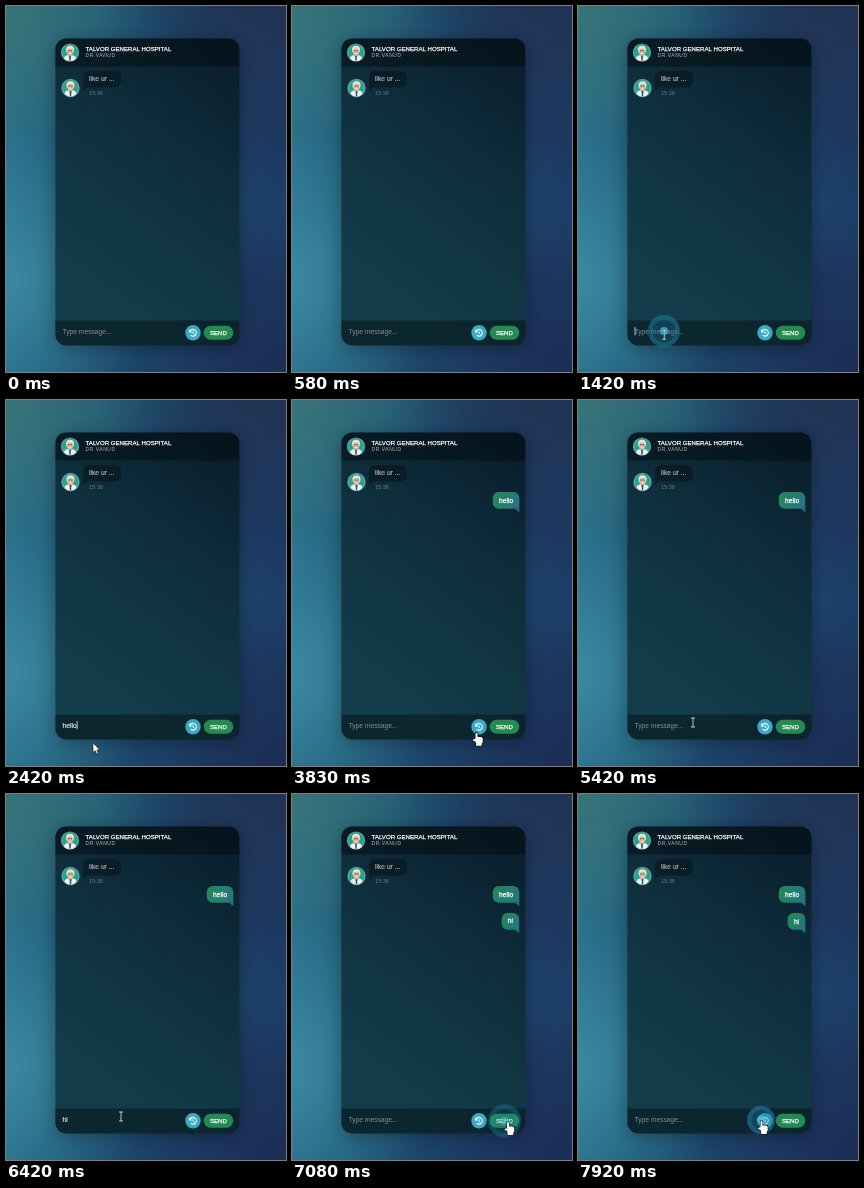
Recreate the animation shown at these times as an HTML page with a canvas. Size 280 by 366 pixels, loop 8000 ms.

```html
<!DOCTYPE html>
<html lang="en">
<head>
<meta charset="utf-8">
<title>Chat</title>
<style>
html, body { margin: 0; width: 100%; height: 100%; overflow: hidden; background: #1b4a6c; }
canvas { display: block; width: 280px; height: 366px; }
</style>
</head>
<body>
<canvas id="stage"></canvas>
<script>
const W = 280, H = 366, LOOP = 8000, STEP = 1000 / 12;
const FONT = '"Liberation Sans", Arial, sans-serif';
const CARD = { x: 49.4, y: 32.4, w: 184, h: 307, r: 11 };
const HEAD = 28, FOOT = 25;
const FIELD = { x: 138.5, y: 324.5 };
const SEND = { x: 212.5, y: 326.8 };
const HISTORY = { x: 187, y: 326.8 };
const KEY_GAP = 146;

const canvas = document.getElementById('stage');
const ratio = window.devicePixelRatio || 1;
canvas.width = W * ratio;
canvas.height = H * ratio;
const ctx = canvas.getContext('2d');
ctx.scale(ratio, ratio);

const messages = [
  { text: 'hello', focus: 1250, type: 1830, send: 3330, at: { x: 86, y: 325 } },
  { text: 'hi', focus: 4520, type: 5910, send: 6830, at: FIELD }
];
const clicks = [
  ...messages.map(m => ({ time: m.focus, at: m.at })),
  ...messages.map(m => ({ time: m.send, at: SEND })),
  { time: 7830, at: { x: 183, y: 326 } }
];
const entry = { x: 44, y: 366 };
const moves = [
  { from: 1000, to: 1250, x: 86, y: 325 },
  { from: 1300, to: 1700, x: 87, y: 343 },
  { from: 3000, to: 3330, x: 211, y: 329 },
  { from: 3600, to: 4170, ...FIELD },
  { from: 4880, to: 5160, x: 115, y: 322.5 },
  { from: 6420, to: 6830, x: 216, y: 328 },
  { from: 7200, to: 7830, x: 183.5, y: 327 }
];

const clamp = u => Math.min(1, Math.max(0, u));
const ease = u => u * u * (3 - 2 * u);

function linear(x0, y0, x1, y1, ...colors) {
  const g = ctx.createLinearGradient(x0, y0, x1, y1);
  colors.forEach((c, i) => g.addColorStop(i / (colors.length - 1), c));
  return g;
}

function glow(x, y, r, rgb, alpha) {
  const g = ctx.createRadialGradient(x, y, 0, x, y, r);
  g.addColorStop(0, `rgba(${rgb},${alpha})`);
  g.addColorStop(.5, `rgba(${rgb},${alpha * .5})`);
  g.addColorStop(1, `rgba(${rgb},0)`);
  ctx.fillStyle = g;
  ctx.fillRect(0, 0, W, H);
}

function box(x, y, w, h, radii, fill) {
  ctx.beginPath();
  ctx.roundRect(x, y, w, h, radii);
  ctx.fillStyle = fill;
  ctx.fill();
}

function disc(x, y, r, fill) {
  ctx.beginPath();
  ctx.arc(x, y, r, 0, Math.PI * 2);
  ctx.fillStyle = fill;
  ctx.fill();
}

function ring(x, y, r, width, color) {
  ctx.beginPath();
  ctx.arc(x, y, r, 0, Math.PI * 2);
  ctx.strokeStyle = color;
  ctx.lineWidth = width;
  ctx.stroke();
}

function poly(points, fill) {
  ctx.beginPath();
  points.forEach(([x, y]) => ctx.lineTo(x, y));
  ctx.closePath();
  ctx.fillStyle = fill;
  ctx.fill();
}

function label(str, x, y, size, color, spacing = 0, weight = 0) {
  ctx.font = `${size}px ${FONT}`;
  ctx.letterSpacing = spacing + 'px';
  ctx.fillStyle = ctx.strokeStyle = color;
  ctx.fillText(str, x, y);
  if (weight) {
    ctx.lineWidth = weight;
    ctx.strokeText(str, x, y);
  }
  const width = ctx.measureText(str).width;
  ctx.letterSpacing = '0px';
  return width;
}

function backdrop() {
  ctx.fillStyle = linear(0, 0, W, 40, '#2d7590', '#215d7a', '#1c4268', '#1d3860');
  ctx.fillRect(0, 0, W, H);
  glow(0, 0, 150, '62,115,104', .6);
  glow(0, 275, 150, '72,158,178', .6);
  glow(240, 0, 140, '34,46,76', .65);
  glow(280, 366, 130, '26,42,82', .7);
  glow(244, 200, 70, '28,80,122', .4);
}

function avatar(x, y) {
  const r = 8.6;
  ctx.save();
  ctx.beginPath();
  ctx.arc(x, y, r, 0, Math.PI * 2);
  ctx.clip();
  disc(x, y, r, '#24a58c');
  box(x - 6, y + 2.6, 12, 9, 4, '#eef3f4');
  poly([[x - 2, y + 2.4], [x + 2, y + 2.4], [x, y + 7]], '#7fb3cf');
  box(x - .7, y + 3, 1.4, 6, .3, '#2b4a6b');
  disc(x, y - 2.8, 4, '#e6e4df');
  box(x - 2.8, y - 4.2, 5.6, 7.2, 2.7, '#e5b08d');
  for (const side of [-1.3, 1.3]) box(x + side - .9, y - 2.4, 1.8, 1, .4, '#5c4b48');
  box(x - 1.6, y + .3, 3.2, .9, .4, '#efe9e2');
  ctx.restore();
  ring(x, y, r, 1.2, 'rgba(190,220,220,.55)');
}

function card() {
  const { x, y, w, h, r } = CARD;
  ctx.save();
  ctx.shadowColor = 'rgba(0,0,0,.3)';
  ctx.shadowBlur = 18 * ratio;
  ctx.shadowOffsetY = 3 * ratio;
  box(x, y, w, h, r, linear(70, 280, x + w, 60, '#133c4b', '#0f313f', '#0a1f2d'));
  ctx.restore();
  box(x, y, w, HEAD, [r, r, 0, 0], 'rgba(0,0,0,.36)');
  box(x, y + h - FOOT, w, FOOT, [0, 0, r, r], 'rgba(0,0,0,.36)');
  avatar(64, 46.6);
  label('TALVOR GENERAL HOSPITAL', 79.6, 45, 6.1, '#fff', 0, .25);
  label('DR.VANUD', 79.6, 51, 4.9, 'rgba(255,255,255,.72)', .61);

  const shade = 'rgba(0,0,0,.32)';
  box(77, 65, 38, 16.5, [6, 6, 6, 0], shade);
  poly([[77, 81.5], [81.3, 81.5], [77, 85]], shade);
  label('like ur ...', 83, 75.4, 6.7, 'rgba(255,255,255,.58)', 0, .2);
  label('15:38', 83, 89.2, 5.5, 'rgba(255,255,255,.38)');
  avatar(64.5, 82);
}

function bubble(t, { text, send }, row) {
  if (t < send) return;
  const u = clamp((t - send) / 500);
  const scale = u < 1 ? 1 - Math.exp(-7 * u) * Math.cos(15 * u) : 1;
  ctx.font = `6.7px ${FONT}`;
  const w = ctx.measureText(text).width + 12.4, h = 16.8;
  ctx.save();
  ctx.beginPath();
  ctx.rect(CARD.x, CARD.y + HEAD, CARD.w, CARD.h - HEAD - FOOT);
  ctx.clip();
  ctx.translate(227.3 - w, 92 + 27 * row);
  ctx.scale(scale, scale);
  box(0, 0, w, h, [6, 6, 0, 6], linear(0, 0, w, h, '#248a52', '#257287'));
  poly([[w - 4.3, h], [w, h], [w, h + 3.5]], '#257287');
  label(text, 6.2, 10.5, 6.7, '#fff', 0, .25);
  ctx.restore();
}

function controls() {
  const { x, y } = HISTORY, ink = '#f4fbfc';
  disc(x, y, 7.7, '#3aaac4');
  ctx.strokeStyle = ink;
  ctx.lineWidth = 1.1;
  ctx.beginPath();
  ctx.arc(x, y, 3.3, -2.7, 2.35);
  ctx.stroke();
  poly([[x - 4, y - 3.6], [x - 4, y - .3], [x - .8, y - .3]], ink);
  ctx.lineWidth = .9;
  ctx.beginPath();
  ctx.moveTo(x, y - 1.8);
  ctx.lineTo(x, y + .3);
  ctx.lineTo(x + 1.4, y + 1.2);
  ctx.stroke();
  box(SEND.x - 14.8, SEND.y - 7, 29.6, 14, 7, '#248a52');
  label('SEND', SEND.x - 8.6, SEND.y + 2.1, 6.1, '#fff', 0, .25);
}

function field(t) {
  const active = messages.find(m => t >= m.focus && t < m.send);
  let str = '', since = Infinity;
  if (active) {
    const { text, type, focus } = active;
    const count = Math.min(text.length, Math.max(0, Math.floor((t - type) / KEY_GAP) + 1));
    str = text.slice(0, count);
    since = t - (count ? type + (count - 1) * KEY_GAP : focus);
  }
  let end = 57;
  if (str) end += label(str, 56.5, 328, 6.7, '#eef3f5', 0, .15);
  else label('Type message...', 56.5, 328, 6.7, 'rgba(255,255,255,.48)');
  if (since % 565 < 330) {
    ctx.fillStyle = '#dfe8ec';
    ctx.fillRect(end - .4, 321, .8, 8.3);
  }
}

function ripple(t, { time, at: { x, y } }) {
  const age = (t - time) / 380;
  if (age < 0 || age > 1) return;
  const r = 17 * (1 - Math.exp(-7.3 * age - .15));
  ctx.save();
  ctx.globalAlpha = 1 - age * age;
  disc(x, y, r, 'rgba(28,125,160,.38)');
  ring(x, y, r * .82, r * .28, 'rgba(36,140,175,.35)');
  disc(x, y, 4, 'rgba(66,190,230,.95)');
  ctx.restore();
}

function pointerAt(t) {
  let { x, y } = entry;
  for (const m of moves) {
    const u = ease(clamp((t - m.from) / (m.to - m.from)));
    // sideways strokes sag a little, as a wrist does
    const sag = Math.abs(m.x - x) * .08 * Math.sin(Math.PI * u);
    x += (m.x - x) * u;
    y += (m.y - y) * u + sag;
    if (u < 1) break;
  }
  return { x, y };
}

function arrow() {
  poly([[0, 0], [0, 9.6], [2.2, 7.6], [3.8, 11.2], [5.4, 10.5], [3.9, 7], [6.8, 6.8]], '#fff');
  ctx.strokeStyle = '#111';
  ctx.lineWidth = .6;
  ctx.stroke();
}

function beam() {
  for (const [color, width] of [['rgba(0,0,0,.6)', 1.7], ['#e4eaec', .9]]) {
    ctx.strokeStyle = color;
    ctx.lineWidth = width;
    ctx.beginPath();
    for (const end of [-4.5, 4.5]) {
      ctx.moveTo(-2, end);
      ctx.lineTo(2, end);
    }
    ctx.moveTo(0, -4.5);
    ctx.lineTo(0, 4.5);
    ctx.stroke();
  }
}

function hand() {
  for (const [pad, color] of [[.6, '#111'], [0, '#fff']]) {
    const part = (x, y, w, h, r) => box(x - pad, y - pad, w + 2 * pad, h + 2 * pad, r, color);
    part(-1, 0, 2, 9, 1);
    part(-1, 4.4, 7.2, 6.6, 2);
    part(-3.4, 6.4, 4, 2.2, 1);
    part(-.4, 9, 5.6, 4, .5);
  }
}

function pointer(t) {
  if (t < moves[0].from) return;
  const { x, y } = pointerAt(t);
  const inRow = Math.abs(y - SEND.y) < 8.5;
  const inButton = Math.hypot(x - HISTORY.x, y - HISTORY.y) < 7.7
    || (inRow && Math.abs(x - SEND.x) < 14.8);
  ctx.save();
  ctx.translate(x, y);
  if (inButton) hand();
  else if (inRow && x > 55 && x < 177) beam();
  else arrow();
  ctx.restore();
}

function draw(now) {
  // the picture advances 12 times a second
  const t = Math.floor((now % LOOP + 3.4) / STEP) * STEP % LOOP;
  backdrop();
  card();
  messages.forEach((m, row) => bubble(t, m, row));
  controls();
  field(t);
  clicks.forEach(c => ripple(t, c));
  pointer(t);
}

const begin = performance.now();
function tick() {
  draw(performance.now() - begin);
  requestAnimationFrame(tick);
}
tick();
</script>
</body>
</html>
```
